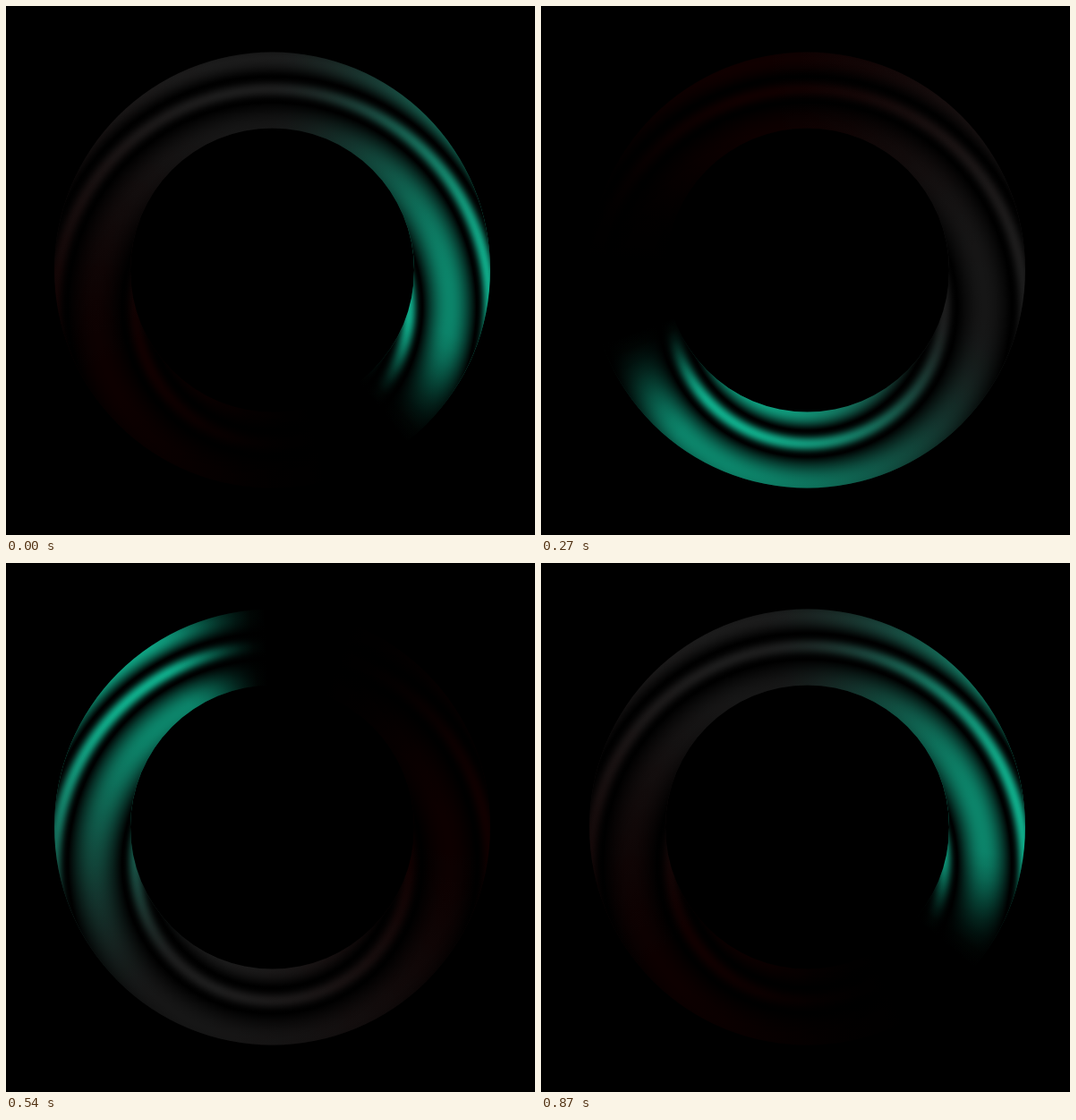
An HTML page with a canvas that plays this animation: 591x591 px, repeating every 0.9 s.

```html
<!DOCTYPE html>
<html lang="en">
<head>
<meta charset="utf-8">
<title>Glossy ring spinner</title>
<style>
  html, body { margin: 0; width: 100%; height: 100%; overflow: hidden; background: #000; }
  canvas { display: block; }
</style>
</head>
<body>
<canvas id="stage" width="591" height="591"></canvas>
<script>
const ctx = document.getElementById('stage').getContext('2d');
const CX = 297.5, CY = 295, OUTER = 243.5, INNER = 158.5;
const FRAME = 30, STEPS = 30, START = 142;
const GLOSS_Y = 336, CREST = 198, REACH = 290;

const BLACK = [0, 0, 0], GREEN = [16, 176, 141], GREY = [29, 29, 29], RED = [17, 0, 0];

const smoothstep = (from, to, x) => {
  const t = Math.min(1, Math.max(0, (x - from) / (to - from)));
  return t * t * (3 - 2 * t);
};
const mix = (a, b, t) => a.map((v, i) => v + (b[i] - v) * t);

// Trail colour by degrees behind the head: black, green, grey, red, black
function trailColor(behind) {
  let color = mix(BLACK, GREEN, smoothstep(0, 34, behind));
  color = mix(color, GREY, smoothstep(45, 145, behind));
  color = mix(color, RED, smoothstep(155, 265, behind));
  color = mix(color, BLACK, smoothstep(265, 340, behind));
  return `rgb(${color.map(Math.round)})`;
}

const lobe = (x, center, half, power) =>
  Math.abs(x - center) < half ? Math.cos(Math.PI / 2 * (x - center) / half) ** power : 0;

// Brightness by distance from the crest: a broad band, a thin line, an outer band
const gloss = d => .75 * lobe(d, 0, 30, 1) + .97 * lobe(d, 45, 15, 2.6) + .92 * lobe(d, 80, 20, 1.2);

const shade = ctx.createRadialGradient(CX, GLOSS_Y, 0, CX, GLOSS_Y, REACH);
for (let r = 110; r <= 286; r += 2) {
  shade.addColorStop(r / REACH, `rgba(0,0,0,${(1 - gloss(Math.abs(r - CREST))).toFixed(3)})`);
}

const ring = new Path2D();
ring.arc(CX, CY, OUTER, 0, 2 * Math.PI);
ring.closePath();
ring.moveTo(CX + INNER, CY);
ring.arc(CX, CY, INNER, 0, 2 * Math.PI);

function draw(step) {
  const head = START + step * 360 / STEPS;
  const trail = ctx.createConicGradient((head - 90) * Math.PI / 180, CX, CY);
  for (let behind = 0; behind <= 360; behind += 4) {
    trail.addColorStop(1 - behind / 360, trailColor(behind));
  }
  ctx.fillStyle = '#000';
  ctx.fillRect(0, 0, 591, 591);
  for (const paint of [trail, shade]) {
    ctx.fillStyle = paint;
    ctx.fill(ring, 'evenodd');
  }
}

function tick() {
  draw(Math.floor(performance.now() / FRAME) % STEPS);
  requestAnimationFrame(tick);
}
tick();
</script>
</body>
</html>
```
